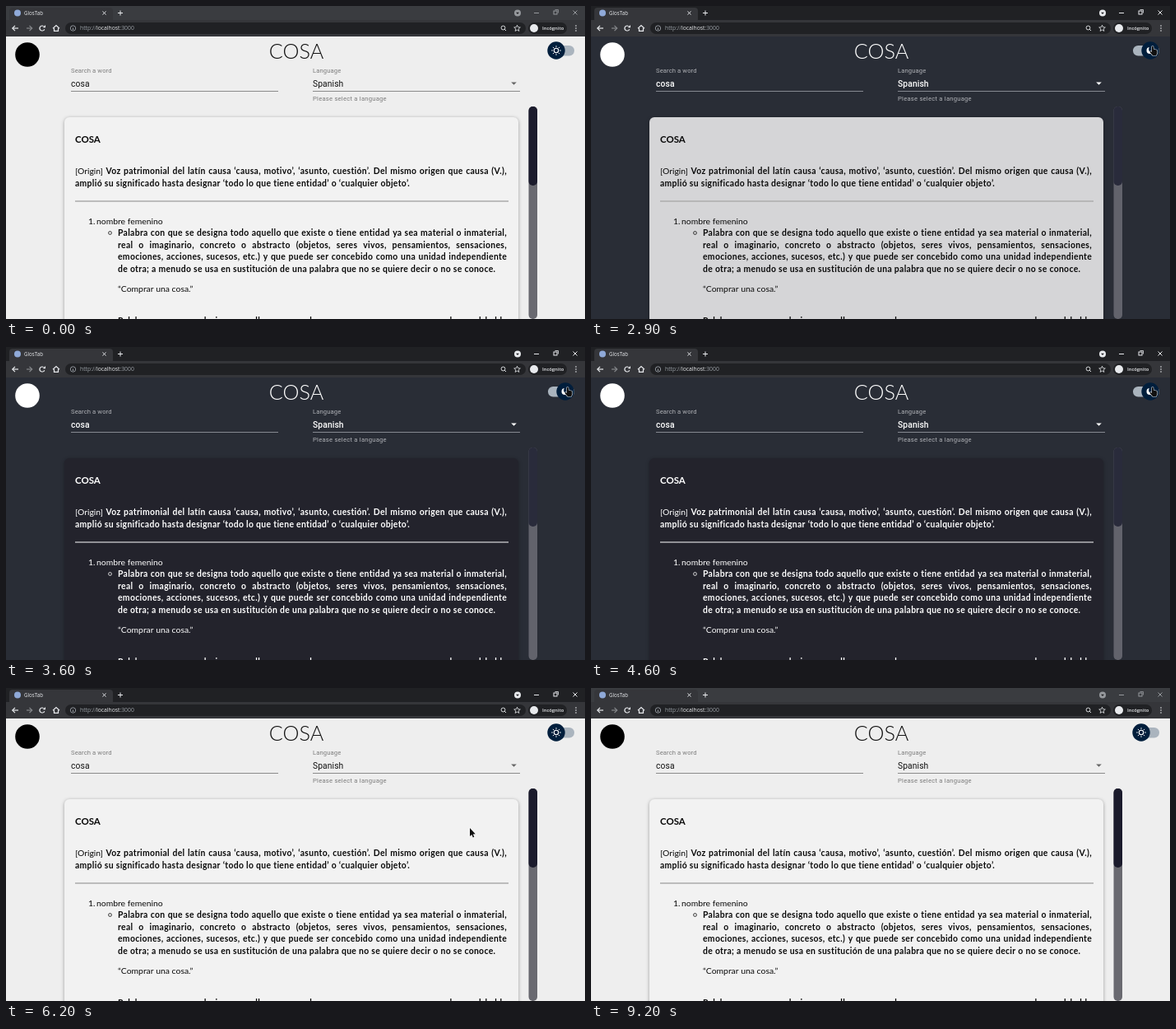
Recreate the animation shown at these times as an HTML page with a canvas. Size 704 by 380 pixels, loop 9300 ms.

```html
<!DOCTYPE html>
<html lang="es">
<head>
<meta charset="utf-8">
<title>Dictionary</title>
<style>
  html, body { margin: 0; width: 100%; height: 100%; overflow: hidden; background: #eee; }
  canvas { display: block; }
</style>
</head>
<body>
<canvas id="stage" width="704" height="380"></canvas>
<script>
const ctx = document.getElementById('stage').getContext('2d');
const LOOP = 9300, STEP = 100;
const TO_DARK = 2837, TO_LIGHT = 4605, FADE = 500;
const ACTIVE_FROM = 500, ACTIVE_TO = 7300;
const LATO = 'Lato, sans-serif', ROBOTO = 'Roboto, sans-serif', UI = '"Open Sans", sans-serif';
const PLAIN = '10.4px ' + LATO, BOLD = 'bold 10.4px ' + LATO, BOLD_SPACING = .32;

// time, x, y of the pointer tip
const POINTER = [
  [200, 430, 390], [600, 150, 95], [900, 150, 95], [1200, 681, 43], [1800, 682, 49],
  [5600, 682, 49], [6200, 564, 170], [6500, 560, 182], [7100, 480, 392]
];

const DEFINITION = [
  'Palabra con que se designa todo aquello que existe o tiene entidad ya sea material o inmaterial,',
  'real o imaginario, concreto o abstracto (objetos, seres vivos, pensamientos, sensaciones,',
  'emociones, acciones, sucesos, etc.) y que puede ser concebido como una unidad independiente',
  'de otra; a menudo se usa en sustitución de una palabra que no se quiere decir o no se conoce.'
];

const clamp = v => Math.max(0, Math.min(1, v));
const mix = (a, b, k) => a + (b - a) * k;
const blend = (a, b, k) => `rgb(${a.map((v, i) => Math.round(mix(v, b[i], k))).join(',')})`;

// CSS "ease" curve: cubic-bezier(.25, .1, .25, 1)
function ease(x) {
  x = clamp(x);
  let lo = 0, hi = 1;
  for (let i = 0; i < 20; i++) {
    const u = (lo + hi) / 2;
    if (.75 * u * (1 - u) + u ** 3 < x) lo = u; else hi = u;
  }
  return .3 * lo * (1 - lo) ** 2 + 3 * lo * lo * (1 - lo) + lo ** 3;
}

function rect(x, y, w, h, color, radius = 0) {
  ctx.fillStyle = color;
  ctx.beginPath();
  ctx.roundRect(x, y, w, h, radius);
  ctx.fill();
}

function disc(x, y, r, color) {
  ctx.fillStyle = color;
  ctx.beginPath();
  ctx.arc(x, y, r, 0, 7);
  ctx.fill();
}

function ring(x, y, r, color, width = 1) {
  ctx.strokeStyle = color;
  ctx.lineWidth = width;
  ctx.beginPath();
  ctx.arc(x, y, r, 0, 7);
  ctx.stroke();
}

function trace(points, close) {
  ctx.beginPath();
  points.forEach(([x, y]) => ctx.lineTo(x, y));
  if (close) ctx.closePath();
}

function line(points, color, width = 1) {
  ctx.strokeStyle = color;
  ctx.lineWidth = width;
  trace(points);
  ctx.stroke();
}

function shape(points, color) {
  ctx.fillStyle = color;
  trace(points, true);
  ctx.fill();
}

function text(str, x, y, font, color, spacing = 0, align = 'left') {
  ctx.font = font;
  ctx.fillStyle = color;
  ctx.letterSpacing = spacing + 'px';
  ctx.textAlign = align;
  ctx.fillText(str, x, y);
  const width = ctx.measureText(str).width;
  ctx.letterSpacing = '0px';
  return x + width;
}

const bold = (str, x, y, color) => text(str, x, y, BOLD, color, BOLD_SPACING);

function justified(str, left, right, y, color) {
  const words = str.split(' ');
  ctx.font = BOLD;
  const widths = words.map(w => ctx.measureText(w).width + w.length * BOLD_SPACING);
  const gap = (right - left - widths.reduce((a, b) => a + b)) / (words.length - 1);
  words.forEach((w, i) => {
    bold(w, left, y, color);
    left += widths[i] + gap;
  });
}

function drawBrowser(active) {
  const light = '#e8eaed';
  const dim = active ? light : '#96999d';
  rect(0, 0, 704, 18, active ? '#202124' : '#3a3c40');
  rect(0, 17, 704, 20, '#35363a');
  rect(4, 2, 126, 18, '#35363a', 4);
  disc(14, 8.5, 4, '#8fa9d8');
  text('GlosTab', 22, 11, '6.2px ' + UI, light);
  const cross = (x, y, r, color) => {
    line([[x - r, y - r], [x + r, y + r]], color);
    line([[x - r, y + r], [x + r, y - r]], color);
  };
  cross(119.5, 8.5, 2, light);
  line([[136, 8.5], [142, 8.5]], light);
  line([[139, 5.5], [139, 11.5]], light);
  disc(622, 8.5, 4, dim);
  shape([[620, 7.7], [624, 7.7], [622, 10]], '#202124');
  line([[642, 8.5], [648, 8.5]], dim);
  ctx.strokeRect(666, 6, 4, 4);
  line([[667.5, 4.5], [671.5, 4.5], [671.5, 8.5]], dim, .8);
  cross(692, 8, 2.5, dim);

  line([[15, 27], [8, 27]], light, 1.2);
  line([[11, 23.8], [7.8, 27], [11, 30.2]], light, 1.2);
  line([[25, 27], [31.5, 27]], '#85878b', 1.2);
  line([[28.5, 23.8], [31.7, 27], [28.5, 30.2]], '#85878b', 1.2);
  ctx.strokeStyle = light;
  ctx.beginPath();
  ctx.arc(44, 27, 3, .4, 5.3);
  ctx.stroke();
  shape([[44.7, 26.2], [48, 26.2], [48, 23]], light);
  line([[57, 27.2], [61, 23.6], [65, 27.2]], light, 1.2);
  line([[58.5, 27], [58.5, 30.4], [63.5, 30.4], [63.5, 27]], light, 1.2);

  rect(72, 20, 560, 14, '#202124', 7);
  ring(81.5, 27, 3.2, '#9aa0a6', .9);
  line([[81.5, 26.5], [81.5, 29]], '#9aa0a6');
  const address = '6.8px ' + UI;
  let x = text('http://', 90, 29.4, address, '#9aa0a6');
  x = text('localhost', x, 29.4, address, light);
  text(':3000', x, 29.4, address, '#9aa0a6');
  ring(604.5, 26.5, 2.4, light, .9);
  line([[606.3, 28.3], [608, 30]], light);
  const star = Array.from({ length: 11 }, (_, i) => {
    const a = i * Math.PI / 5 - Math.PI / 2, r = i % 2 ? 1.8 : 4;
    return [621.5 + r * Math.cos(a), 27.2 + r * Math.sin(a)];
  });
  line(star, light, .8);
  rect(635, 20, 47, 14, '#202124', 7);
  disc(642, 27, 5, light);
  text('Incógnito', 652, 29.3, '600 5.8px ' + UI, light);
  [24, 27, 30].forEach(y => disc(693, y, .8, light));
}

function drawHeader(dark, focused, caret) {
  const ink = dark ? '#fff' : '#111';
  const soft = dark ? '#b0b2b7' : '#7c7c7c';
  const rule = dark ? '#868991' : '#8b8b8b';
  const small = '7.65px ' + ROBOTO, body = (dark ? '500' : '400') + ' 10.3px ' + ROBOTO;
  disc(26, 59, 14.8, dark ? '#fff' : '#000');
  text('COSA', 353, 63.5, '300 25.2px ' + LATO, ink, 0, 'center');
  text('Search a word', 79, 81, small, focused ? '#333' : soft, .1);
  text('cosa', 79, 97.5, body, ink, .1);
  if (caret) rect(101, 88, 1, 11, '#222');
  if (focused) rect(79, 102.5, 252, 1.5, '#1c1c1c');
  else rect(79, 103, 252, 1, rule);
  text('Language', 373, 81, small, soft, .1);
  text('Spanish', 373, 97.5, body, ink, .1);
  rect(373, 103, 252, 1, rule);
  shape([[614.2, 92.5], [620.8, 92.5], [617.5, 95.8]], dark ? '#fff' : '#666');
  text('Please select a language', 373, 115, small, soft, .23);
}

function drawToggle(dark) {
  rect(659, 48, 32, 12.5, '#aab4be', 6.2);
  const x = dark ? 680 : 669;
  disc(x, 54, 10.7, '#001e3c');
  if (dark) {
    disc(x - .5, 54, 4, '#fff');
    disc(x + 1.5, 52.5, 3.4, '#001e3c');
    return;
  }
  ring(x, 54, 2.7, '#fff', 1.1);
  for (let i = 0; i < 8; i++) {
    const c = Math.cos(i * Math.PI / 4), s = Math.sin(i * Math.PI / 4);
    line([[x + c * 4.2, 54 + s * 4.2], [x + c * 5.8, 54 + s * 5.8]], '#fff', 1);
  }
}

function drawScrollbar(dark) {
  rect(635.5, 122, 10.5, 258, dark ? '#62636c' : '#696970', 5);
  rect(635.5, 122, 10.5, 96, dark ? '#292b3b' : '#1b1b2c', 5);
}

function drawCard(shade) {
  // the text colour trails the background slightly
  const ink = blend([10, 10, 10], [255, 255, 255], clamp((shade - .15) / .85));
  ctx.save();
  ctx.shadowColor = 'rgba(0,0,0,.35)';
  ctx.shadowBlur = 4;
  ctx.shadowOffsetY = 1;
  rect(71, 135, 552, 260, blend([242, 242, 242], [35, 35, 44], shade), 6);
  ctx.restore();

  text('COSA', 84, 166, 'bold 11.5px ' + LATO, ink);
  text('[Origin]', 84, 204, PLAIN, ink);
  justified('Voz patrimonial del latín causa ‘causa, motivo’, ‘asunto, cuestión’. Del mismo origen que causa (V.),',
    121.5, 609, 204, ink);
  bold('amplió su significado hasta designar ‘todo lo que tiene entidad’ o ‘cualquier objeto’.', 84, 218.5, ink);
  rect(84, 236.5, 527, 1, blend([135, 135, 135], [255, 255, 255], shade));

  text('1.', 100, 264.7, PLAIN, ink);
  text('nombre femenino', 110, 264.7, PLAIN, ink);
  ring(126.5, 275.5, 1.9, ink, .8);
  DEFINITION.forEach((row, i) => {
    const y = 279 + i * 14.5;
    if (i < 3) justified(row, 136, 609, y, ink);
    else bold(row, 136, y, ink);
  });
  text('“Comprar una cosa.”', 136, 347, PLAIN, ink);
  justified('Palabra con que se designa aquello cuyo nombre no se conoce o no se recuerda en el habla',
    136, 609, 386, ink);
}

function pointerAt(t) {
  const next = POINTER.findIndex(p => p[0] > t);
  if (next < 1) return null;
  const [t0, x0, y0] = POINTER[next - 1], [t1, x1, y1] = POINTER[next];
  const k = (t - t0) / (t1 - t0), s = k * k * (3 - 2 * k);
  return [mix(x0, x1, s), mix(y0, y1, s)];
}

function drawPointer(x, y) {
  const overToggle = x > 657 && y < 62;
  const outline = overToggle
    ? [[0, 0], [1.6, 0], [2, 3.6], [6, 4.6], [6.4, 8], [5.2, 11], [1, 11], [-2.6, 7], [-1.7, 5.8], [0, 7]]
    : [[0, 0], [0, 10], [2.3, 8], [3.8, 11.4], [5.3, 10.7], [3.8, 7.4], [6.8, 7.2]];
  ctx.save();
  ctx.translate(x, y);
  ctx.lineJoin = 'round';
  trace(outline, true);
  ctx.strokeStyle = 'rgba(255,255,255,.85)';
  ctx.lineWidth = 1.2;
  ctx.stroke();
  shape(outline, '#111');
  ctx.restore();
}

function render(now) {
  const t = Math.floor(now % LOOP / STEP) * STEP;
  const dark = t >= TO_DARK && t < TO_LIGHT;
  const shade = t < TO_LIGHT ? ease((t - TO_DARK) / FADE) : 1 - ease((t - TO_LIGHT) / FADE);
  const active = t >= ACTIVE_FROM && t < ACTIVE_TO;
  const focused = t >= 700 && t < TO_DARK;
  const caret = focused && Math.floor(t / 200) % 2 === 1;

  rect(0, 0, 704, 380, dark ? '#292d36' : '#eee');
  drawBrowser(active);
  drawHeader(dark, focused, caret);
  drawToggle(dark);
  drawScrollbar(dark);
  drawCard(shade);
  const tip = pointerAt(t);
  if (tip) drawPointer(...tip);
}

const start = performance.now();
function tick() {
  render(performance.now() - start);
  requestAnimationFrame(tick);
}
tick();
</script>
</body>
</html>
```
